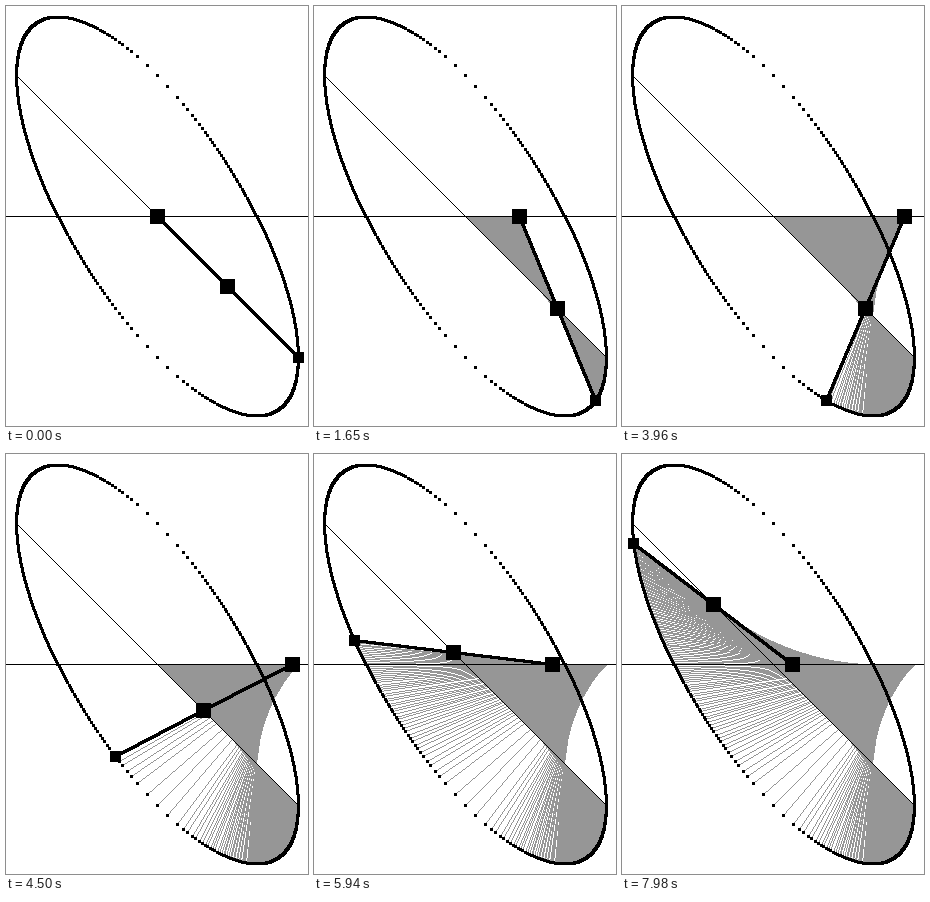
An HTML page with a canvas for the animation above (8 s loop, 302x420 px).

```html
<!DOCTYPE html>
<html lang="en">
<head>
<meta charset="utf-8">
<title>Oblique trammel</title>
<style>
  html, body { margin: 0; width: 100%; height: 100%; overflow: hidden; background: #fff; }
  canvas { display: block; width: 302px; height: 420px; }
</style>
</head>
<body>
<canvas id="stage" width="302" height="420"></canvas>
<script>
const W = 302, H = 420, CX = 151, CY = 210;
const ROD = 100, REACH = 142, LOOP = 8000, TICK = 30;
const COS45 = 0.70710678;
const WHITE = 0xffffffff, GREY = 0xff969696, BLACK = 0xff000000;
const LAST_STEP = Math.floor(LOOP / TICK) - 1;

const ctx = document.getElementById('stage').getContext('2d');
const image = ctx.createImageData(W, H);
const pixels = new Uint32Array(image.data.buffer);
const ink = new Uint8Array(W * H);                    // axes and ellipse
const swept = new Uint16Array(W * H).fill(0xffff);    // first step that covers a pixel

const place = (x, y) => [CX + Math.trunc(x), CY + Math.trunc(y)];

// Law of cosines: the pivot on the diagonal, one rod length from the slider.
function rod(d, branch) {
  const near = d * COS45;
  const q = near + branch * Math.sqrt(Math.max(0, ROD * ROD - near * near));
  const s = q * COS45;
  return { slider: place(d, 0), pivot: place(s, s), pen: place(2 * s - d, 2 * s) };
}

// The slider goes right one pixel per step, then returns on the other branch.
const pose = step => step > REACH ? rod(2 * REACH - step, -1) : rod(step, 1);

function plotLine([x, y], [x1, y1], plot) {
  const dx = Math.abs(x1 - x), dy = -Math.abs(y1 - y);
  const sx = x < x1 ? 1 : -1, sy = y < y1 ? 1 : -1;
  let err = dx + dy;
  for (;;) {
    plot(x, y);
    if (x === x1 && y === y1) return;
    const e2 = 2 * err;
    if (e2 >= dy) { err += dy; x += sx; }
    if (e2 <= dx) { err += dx; y += sy; }
  }
}

function plotRod({ slider, pivot, pen }, plot) {
  plotLine(slider, pivot, plot);
  plotLine(pivot, pen, plot);
}

function prepare() {
  const mark = (x, y) => { ink[y * W + x] = 1; };
  const dot = ([x, y]) => {
    for (let j = -1; j <= 1; j++) plotLine([x - 1, y + j], [x + 1, y + j], mark);
  };
  plotLine([0, CY], [W - 1, CY], mark);
  plotLine(rod(0, -1).pen, rod(0, 1).pen, mark);
  for (let d = -REACH; d <= REACH; d++) {
    dot(rod(d, 1).pen);
    dot(rod(d, -1).pen);
  }
  for (let step = 0; step <= LAST_STEP; step++) {
    plotRod(pose(step), (x, y) => {
      const i = y * W + x;
      swept[i] = Math.min(swept[i], step);
    });
  }
}

function square(x, y, half) {
  ctx.fillRect(x - half, y - half, 2 * half + 1, 2 * half + 1);
}

function draw(step) {
  for (let i = 0; i < pixels.length; i++) {
    pixels[i] = ink[i] ? BLACK : swept[i] <= step ? GREY : WHITE;
  }
  ctx.putImageData(image, 0, 0);

  const now = pose(step);
  plotRod(now, (x, y) => square(x, y, 1));
  square(...now.slider, 7);
  square(...now.pivot, 7);
  square(...now.pen, 5);
}

let shown = -1;
function frame() {
  const t = performance.now() % LOOP;
  const step = Math.max(0, Math.floor(t / TICK) - 1);
  if (step !== shown) draw(shown = step);
  requestAnimationFrame(frame);
}

prepare();
frame();
</script>
</body>
</html>
```
